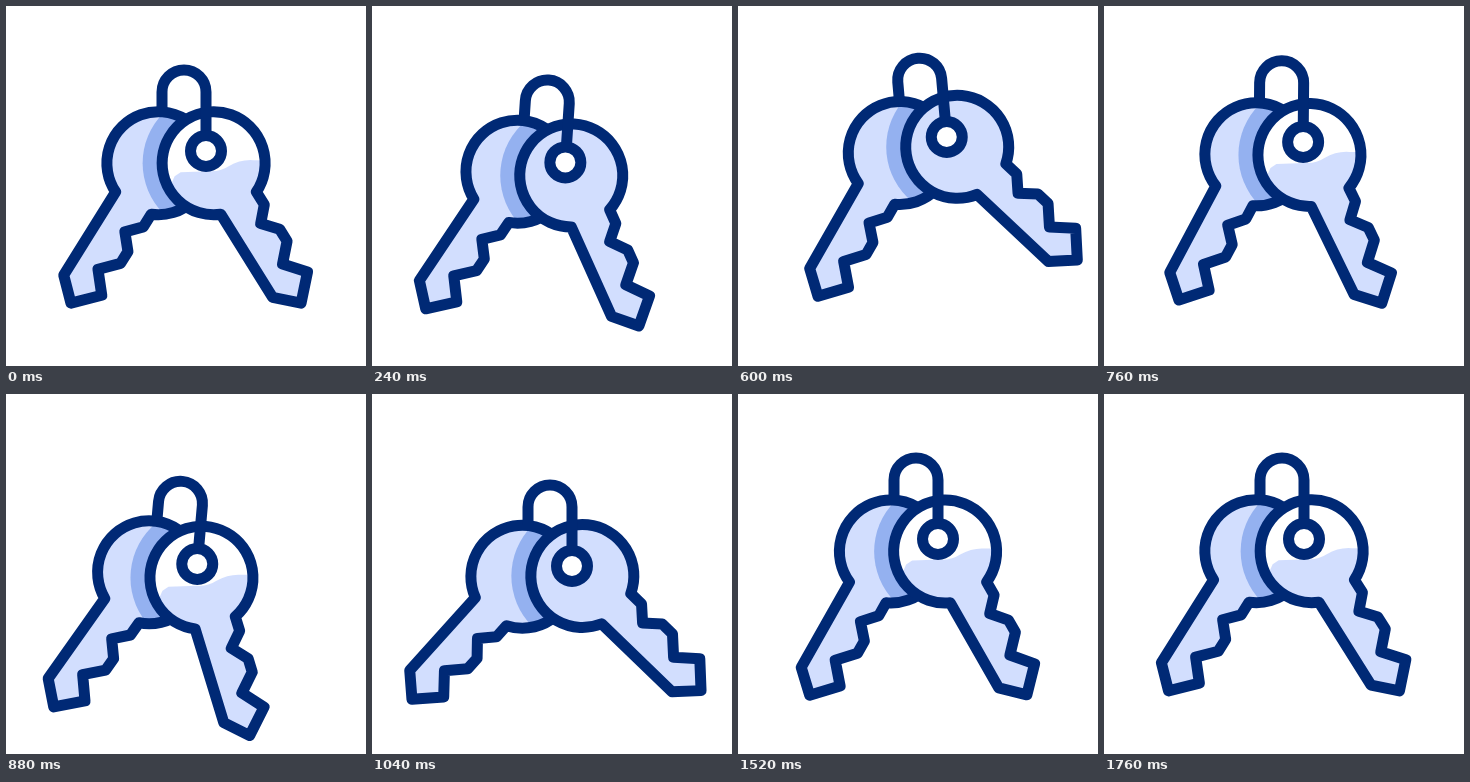
An HTML page with a canvas that plays this animation: 360x360 px, repeating every 1840 ms.

```html
<!DOCTYPE html>
<html>
<head>
<meta charset="utf-8">
<style>
html, body { margin: 0; width: 100%; height: 100%; overflow: hidden; background: #fff; }
canvas { display: block; }
</style>
</head>
<body>
<canvas id="stage" width="360" height="360"></canvas>
<script>
const ctx = document.getElementById('stage').getContext('2d');
const INK = '#002975', FILL = '#d2defe', SHADE = '#94b1f0';
const LOOP = 1840, STEP = 40, TAU = Math.PI * 2, RAD = Math.PI / 180;
const HOLE = 14.4; // distance from the key's hole to the centre of its head

// Head centred on the origin, blade pointing down
const key = new Path2D('M-21 47V145L0 165L22 142L5 122L21 105V91L8 76L21 62V47A51.5 51.5 0 1 0 -21 47Z');
const shackle = new Path2D('M-44 -42V-59A22 22 0 0 1 0 -59V-15');
const gloss = new Path2D('M-60 -60H60V-3H40Q27 -4 15 3Q6 9 -5 8L-33 9L-39 13L-43 22H-60Z');

// Time, height of the ring, tilt of the bunch, left key angle, right key angle
const poses = [
  [0, 145, 0, 32, -32],
  [120, 147, 1, 32, -31],
  [200, 152, 3, 33, -27],
  [320, 167, 5, 37, -21],
  [400, 181, 4.7, 49, -35],
  [480, 172, 0, 43, -46],
  [560, 145, -4, 33, -51],
  [600, 131, -5, 29.7, -46.7],
  [680, 124, -3, 25.8, -36.5],
  [760, 136, 0.5, 28, -26],
  [880, 170, 5, 35.3, -17],
  [960, 181, 4.7, 46, -35],
  [1040, 172, 0, 42, -46],
  [1120, 145, -4, 33, -51],
  [1160, 131, -5, 29.7, -46.7],
  [1240, 124, -3, 25.8, -36.5],
  [1360, 136, -1, 27, -30],
  [1440, 143, 0, 28, -29],
  [1520, 145, 0, 29.5, -29.7],
  [1680, 145, 0, 32, -32],
  [LOOP, 145, 0, 32, -32]
];

function slope(i, k) {
  const a = poses[i - 1], b = poses[i + 1];
  return a && b ? (b[k] - a[k]) / (b[0] - a[0]) : 0;
}

// Smooth Hermite curve through the poses
function poseAt(t) {
  let i = 0;
  while (poses[i + 1][0] <= t) i++;
  const a = poses[i], b = poses[i + 1], span = b[0] - a[0];
  const u = (t - a[0]) / span, v = 1 - u;
  return [1, 2, 3, 4].map(k =>
    v * v * (1 + 2 * u) * a[k] + u * u * (3 - 2 * u) * b[k] +
    span * u * v * (v * slope(i, k) - u * slope(i + 1, k)));
}

function place(x, y, angle, paint) {
  ctx.save();
  ctx.translate(x, y);
  ctx.rotate(angle * RAD);
  paint();
  ctx.restore();
}

function disc(x, y, r) {
  ctx.beginPath();
  ctx.arc(x, y, r, 0, TAU);
}

function fill(color, path) {
  ctx.fillStyle = color;
  path ? ctx.fill(path) : ctx.fill();
}

function headAt(x, y, angle) {
  return [x - HOLE * Math.sin(angle * RAD), y + HOLE * Math.cos(angle * RAD)];
}

function draw(t) {
  const [y, tilt, leftAngle, rightAngle] = poseAt(t);
  const x = 200 - 1.75 * tilt;
  const right = headAt(x, y, rightAngle);
  const left = headAt(x - 40 * Math.cos(tilt * RAD), y - 40 * Math.sin(tilt * RAD), leftAngle);

  fill('#fff', new Path2D('M0 0H360V360H0Z'));
  ctx.strokeStyle = INK;
  ctx.lineWidth = 11;
  ctx.lineJoin = ctx.lineCap = 'round';

  place(...left, leftAngle, () => fill(FILL, key));
  ctx.save();
  disc(...left, 51.5);
  ctx.clip();
  disc(...right, 71);
  fill(SHADE);
  ctx.restore();
  place(...left, leftAngle, () => ctx.stroke(key));

  place(...right, rightAngle, () => fill(FILL, key));
  if (t < 200 || (t >= 760 && t < 960) || t >= 1400) {
    place(...right, 0, () => {
      disc(0, 0, 51.5);
      ctx.clip();
      fill('#fff', gloss);
    });
  }
  place(...right, rightAngle, () => ctx.stroke(key));

  place(x, y, tilt, () => ctx.stroke(shackle));
  disc(x, y, 15.5);
  fill('#fff');
  ctx.stroke();
}

const start = performance.now();
function tick() {
  const t = (performance.now() - start) % LOOP;
  draw(Math.floor(t / STEP) * STEP);
  requestAnimationFrame(tick);
}
tick();
</script>
</body>
</html>
```
